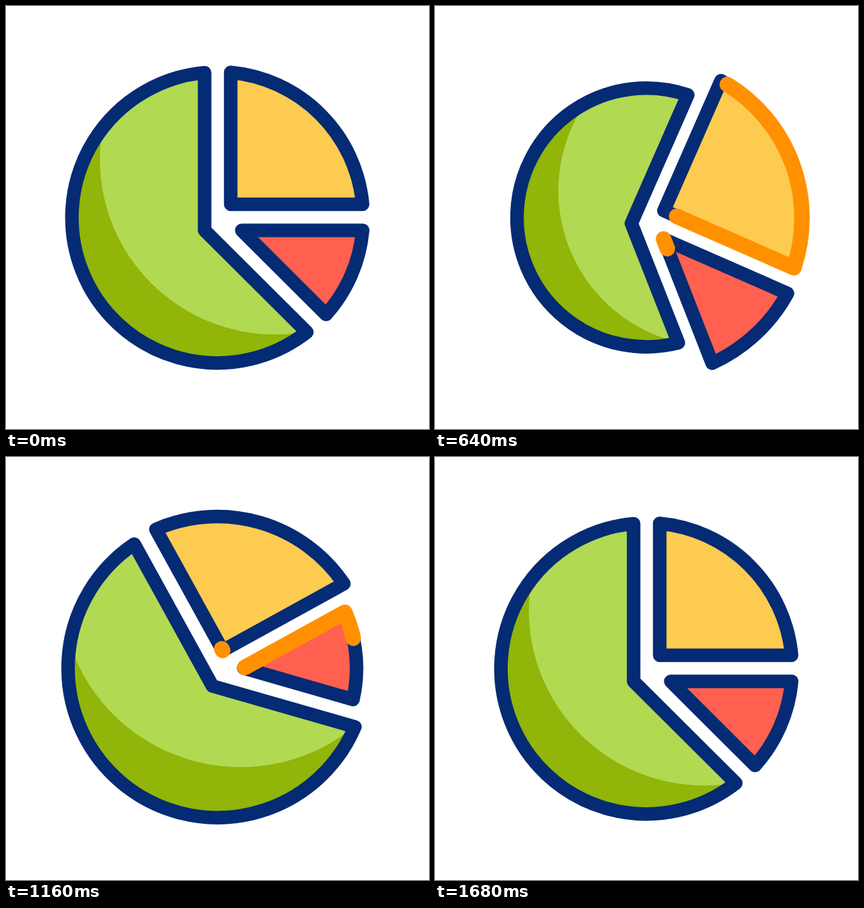
An HTML page for the animation above (2120 ms loop, 640x640 px).

```html
<!DOCTYPE html>
<html lang="en">
<head>
<meta charset="utf-8">
<title>Pie chart</title>
<style>
  html, body { margin: 0; width: 100%; height: 100%; overflow: hidden; background: #fff; }
  svg { display: block; width: 100vw; height: 100vh; }
  path { stroke-linejoin: round; stroke-linecap: round; }
</style>
</head>
<body>
<svg id="stage" viewBox="-320 -320 640 640"></svg>
<script>
const NS = 'http://www.w3.org/2000/svg';
const LOOP = 2120, STEP = 40, START = 80, END = 1680;
const NAVY = '#042b74', ORANGE = '#ff9100';
const LINE = 20.5, TRACE = 23.5;

// Keys are [time, value] pairs, joined by sine easing.
const spin = [[80, 0], [540, 27], [1180, -29], [1505, 0]];

const slices = [
  {
    d: 'M-19.5 19.5L135.2 173.4A220 220 0 1 1 -19.5 -219.1Z',
    apex: [-19.5, 19.5],
    fill: '#91b508',
    shine: { cx: 87, cy: -88, r: 265, fill: '#b1d952' },
    size: [[80, 1], [400, 1.12], [720, 0.85], [1100, 1.04], [1260, 1]]
  },
  {
    d: 'M20 -20L219.5 -20A220.4 220.4 0 0 0 20 -219.5L20 -20Z',
    apex: [20, -20],
    fill: '#fdcb50',
    size: [[260, 1], [546, 1.152], [820, 0.865], [1175, 1.05], [1350, 1]],
    head: [[270, 0], [855, 1]],
    tail: [[575, 0], [1185, 1]]
  },
  {
    d: 'M36.7 19.4L164.3 146.7A220.3 220.3 0 0 0 219.6 19.4L36.7 19.4Z',
    apex: [36.7, 19.4],
    fill: '#ff6050',
    size: [[460, 1], [700, 1.14], [960, 0.87], [1368, 1.045], [1530, 1]],
    head: [[575, 0], [1185, 1]],
    tail: [[835, 0], [1445, 1]]
  }
];

function add(parent, tag, attrs) {
  const el = document.createElementNS(NS, tag);
  for (const k in attrs) el.setAttribute(k, attrs[k]);
  return parent.appendChild(el);
}

function track(keys, t) {
  if (t <= keys[0][0]) return keys[0][1];
  for (let i = 1; i < keys.length; i++) {
    const [t0, a] = keys[i - 1], [t1, b] = keys[i];
    if (t < t1) return a + (b - a) * (1 - Math.cos(Math.PI * (t - t0) / (t1 - t0))) / 2;
  }
  return keys[keys.length - 1][1];
}

const wheel = add(document.getElementById('stage'), 'g', {});

slices.forEach((s, i) => {
  s.group = add(wheel, 'g', {});
  add(s.group, 'path', { d: s.d, fill: s.fill });
  if (s.shine) {
    const clip = add(s.group, 'clipPath', { id: 'clip' + i });
    add(clip, 'path', { d: s.d });
    add(s.group, 'circle', { ...s.shine, 'clip-path': `url(#clip${i})` });
  }
  s.line = add(s.group, 'path', { d: s.d, fill: 'none', stroke: NAVY });
  if (s.head) {
    const open = s.d.replace('Z', '');
    s.trace = add(s.group, 'path', { d: open, fill: 'none', stroke: ORANGE });
    s.length = s.trace.getTotalLength();
  }
});

function draw(t) {
  wheel.setAttribute('transform', `rotate(${track(spin, t)})`);
  for (const s of slices) {
    const k = track(s.size, t);
    // Slices grow from their tip and shrink towards the middle.
    const [x, y] = k > 1 ? s.apex : [0, 0];
    s.group.setAttribute('transform', `translate(${x * (1 - k)} ${y * (1 - k)}) scale(${k})`);
    s.line.setAttribute('stroke-width', LINE / k);
    if (!s.trace) continue;
    const from = track(s.tail, t) * s.length, to = track(s.head, t) * s.length;
    s.trace.style.display = to > from ? '' : 'none';
    s.trace.setAttribute('stroke-width', TRACE / k);
    s.trace.setAttribute('stroke-dasharray', `${to - from} ${s.length * 2}`);
    s.trace.setAttribute('stroke-dashoffset', -from);
  }
}

function frame() {
  const t = Math.floor(performance.now() % LOOP / STEP) * STEP;
  draw(t < START || t >= END ? 0 : t);
  requestAnimationFrame(frame);
}
frame();
</script>
</body>
</html>
```
